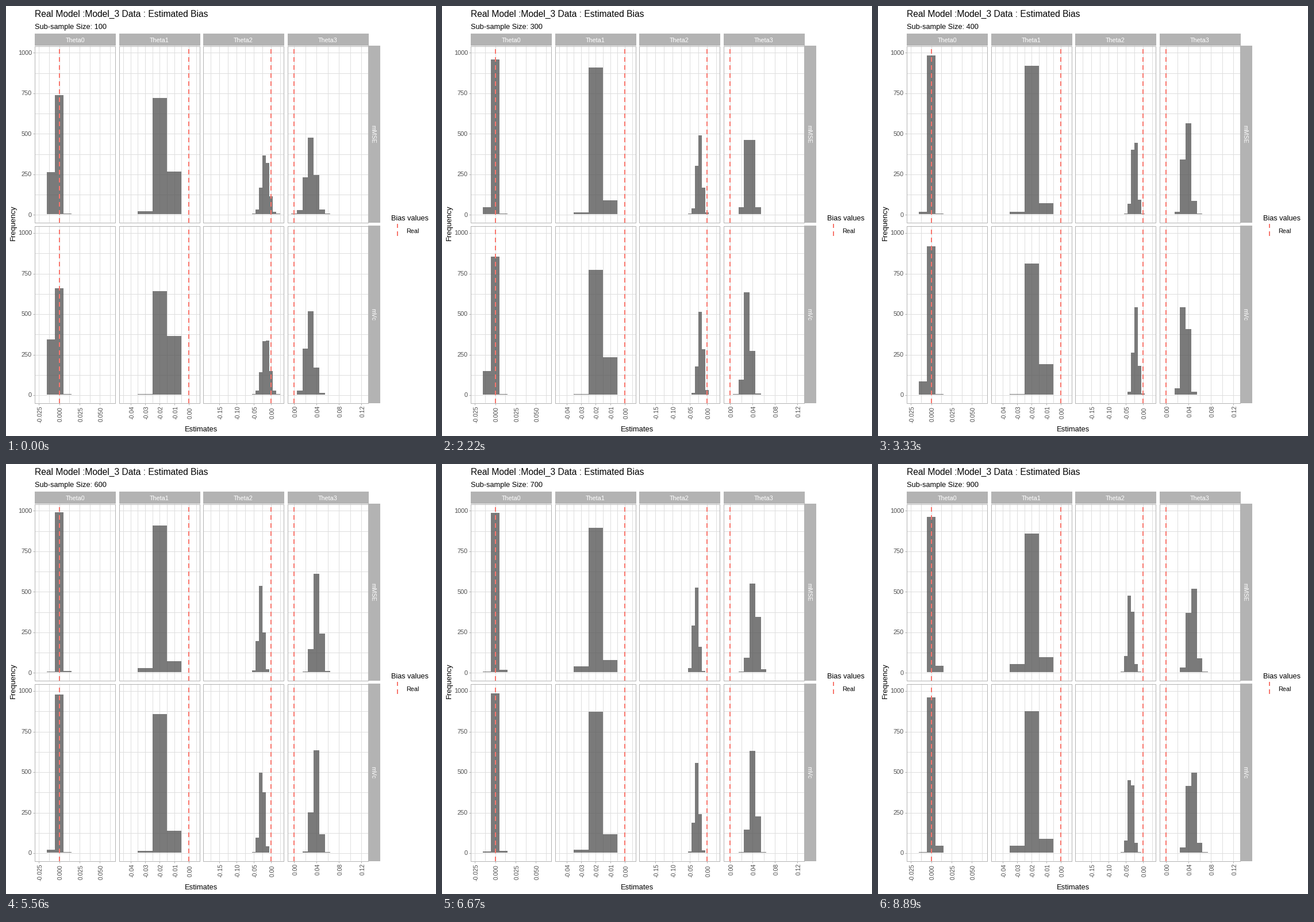
These frames come from a looping animation (748 by 748 pixels, 10 s). A matplotlib script:

```python
import math

import matplotlib.pyplot as plt
import numpy as np
from matplotlib.animation import FuncAnimation
from matplotlib.collections import LineCollection, PolyCollection
from matplotlib.patches import Rectangle

STAGE, DPI = 748, 64
PX = 72 / DPI  # points per pixel
STRIP, GRID, AXIS_TEXT, BAR, REAL = "#B3B3B3", "#DEDEDE", "#4D4D4D", "#595959", "#F8766D"

WIDTH, PITCH = 139.7, 146.5
ROWS = [("mMSE", 69, 376, 362.3), ("mVc", 382, 690, 676.0)]  # name, top, bottom, zero line
UNIT = 0.282  # pixels per count
TRIALS = 1000

# x of zero, pixels per unit, major step, first and last label, decimals
SCALES = [
    (92.55, 1412, 0.025, -1, 2, 3),
    (317.9, 2534, 0.01, -4, 0, 2),
    (461.45, 603, 0.05, -3, 0, 2),
    (501.0, 975, 0.04, 0, 3, 2),
]

# Mean and spread of the bias, in hundredths, at the key sample sizes.
SIZES = np.arange(100, 1000, 100)
KEYS = np.array([100, 300, 900])
MODELS = {
    ("mMSE", 0): ((-0.30, -0.125, 0.172), (0.31, 0.22, 0.188)),
    ("mMSE", 1): ((-1.736, -1.87, -1.946), (0.372, 0.271, 0.337)),
    ("mMSE", 2): ((-1.64, -2.19, -3.63), (1.0, 0.74, 0.69)),
    ("mMSE", 3): ((3.02, 3.50, 4.66), (0.79, 0.58, 0.62)),
    ("mVc", 0): ((-0.366, -0.245, 0.14), (0.327, 0.243, 0.207)),
    ("mVc", 1): ((-1.607, -1.697, -1.942), (0.298, 0.265, 0.323)),
    ("mVc", 2): ((-1.48, -1.855, -3.54), (1.04, 0.71, 0.67)),
    ("mVc", 3): ((2.85, 3.19, 4.58), (0.70, 0.52, 0.59)),
}
BINS = range(-10, 11)


def trend(values, scale):
    """Smooth curve through the key sizes, evaluated at every size."""
    return np.polyval(np.polyfit(scale(KEYS), values, 2), scale(SIZES))


def below(x, mean, spread):
    """Number of trials expected below x under a normal law."""
    return TRIALS * 0.5 * (1 + math.erf((x - mean) / (spread * math.sqrt(2))))


def histogram(mean, spread):
    for k in BINS:
        count = round(below(k + 0.5, mean, spread) - below(k - 0.5, mean, spread))
        if count:
            yield k, count


def bar_boxes(mean, spread, col, base):
    zero, scale = SCALES[col][:2]
    bottom = round(base)
    for k, count in histogram(mean, spread):
        x0, x1 = (round(zero + scale * (k + d) / 100) for d in (-0.5, 0.5))
        top = min(round(base - UNIT * count), bottom - 1)
        yield [(x0, bottom), (x0, top), (x1, top), (x1, bottom)]


def mid(v):
    """Centre of the pixel nearest to v."""
    return math.floor(v + 0.5) + 0.5


fig = plt.figure(figsize=(STAGE / DPI, STAGE / DPI), dpi=DPI, facecolor="white")
ax = fig.add_axes([0, 0, 1, 1])
ax.set(xlim=(0, STAGE), ylim=(STAGE, 0))
ax.axis("off")


def label(x, y, s, size, color="black", **kw):
    return ax.text(x, y, s, fontsize=size * PX, color=color, family="Liberation Sans", **kw)


def turned(x, y, s, size, color="black", angle=90):
    return label(x, y, s, size, color, rotation=angle, ha="center", va="center")


def box(x0, y0, x1, y1):
    ax.add_patch(Rectangle((x0, y0), x1 - x0, y1 - y0, fc=STRIP, lw=0, zorder=1))


def lines(segs, color, z, width=1, **kw):
    ax.add_collection(LineCollection(segs, colors=color, linewidths=width * PX, zorder=z, **kw),
                      autolim=False)


grid, frame, real = [], [], []

for col, (zero, scale, step, lo, hi, digits) in enumerate(SCALES):
    left = 50.3 + PITCH * col
    right = left + WIDTH
    x0, x1 = mid(left), mid(right)
    box(x0 - 0.5, 48, x1 + 0.5, 69)
    label((left + right) / 2, 63, f"Theta{col}", 10.8, "white", ha="center")

    for half in range(-10, 11):
        x = zero + scale * step * half / 2
        if left < x < right:
            grid += [[(mid(x), top), (mid(x), bottom)] for _, top, bottom, _ in ROWS]
    names = [f"{k * step:.{digits}f}" for k in range(lo, hi + 1)]
    label_y = 695 + 2.5 * max(map(len, names))
    for k, name in enumerate(names, lo):
        x = zero + scale * step * k
        frame.append([(mid(x), 691), (mid(x), 694)])
        turned(x + 2.5, label_y, name, 10.5, AXIS_TEXT)

    for _, top, bottom, base in ROWS:
        for count in range(0, TRIALS + 1, 125):
            y = mid(base - UNIT * count)
            grid.append([(x0, y), (x1, y)])
        t, b = top + 0.5, bottom + 0.5
        frame.append([(x0, t), (x1, t), (x1, b), (x0, b), (x0, t)])
        real.append([(round(zero), b), (round(zero), t)])

for name, top, bottom, base in ROWS:
    box(630, top, 651, bottom + 1)
    turned(638.5, (top + bottom) / 2, name, 10.5, "white", -90)
    for count in range(0, TRIALS + 1, 250):
        y = base - UNIT * count
        frame.append([(47, mid(y)), (50, mid(y))])
        label(45, y + 4.3, str(count), 10.9, AXIS_TEXT, ha="right")

real.append([(681, 399.5), (681, 379)])
lines(grid, GRID, 1)
lines(frame, STRIP, 4)
lines(real, REAL, 3, 2, linestyles=[(0, (4, 3))])

label(50, 19, "Real Model :Model_3 Data : Estimated Bias", 15.6)
subtitle = label(50, 40, "", 12.8)
turned(13, 377, "Frequency", 13)
label(340, 740, "Estimates", 13, ha="center")
label(670, 372.5, "Bias values", 12.8)
label(696, 394.5, "Real", 10.9)

bars = PolyCollection([], facecolors=BAR, alpha=0.8, linewidths=0, zorder=2)
ax.add_collection(bars, autolim=False)

steps = [[] for _ in SIZES]
for name, _, _, base in ROWS:
    for col in range(len(SCALES)):
        means, spreads = MODELS[name, col]
        for boxes, mean, spread in zip(steps, trend(means, np.sqrt), trend(spreads, np.log)):
            boxes.extend(bar_boxes(mean, spread, col, base))

FRAMES, INTERVAL = 100, 100


def update(i):
    n = min((i + 1) * len(SIZES) // FRAMES, len(SIZES) - 1)
    bars.set_verts(steps[n])
    subtitle.set_text(f"Sub-sample Size: {SIZES[n]}")
    return bars, subtitle


anim = FuncAnimation(fig, update, frames=FRAMES, interval=INTERVAL, repeat=True, repeat_delay=0)
plt.show()
```
